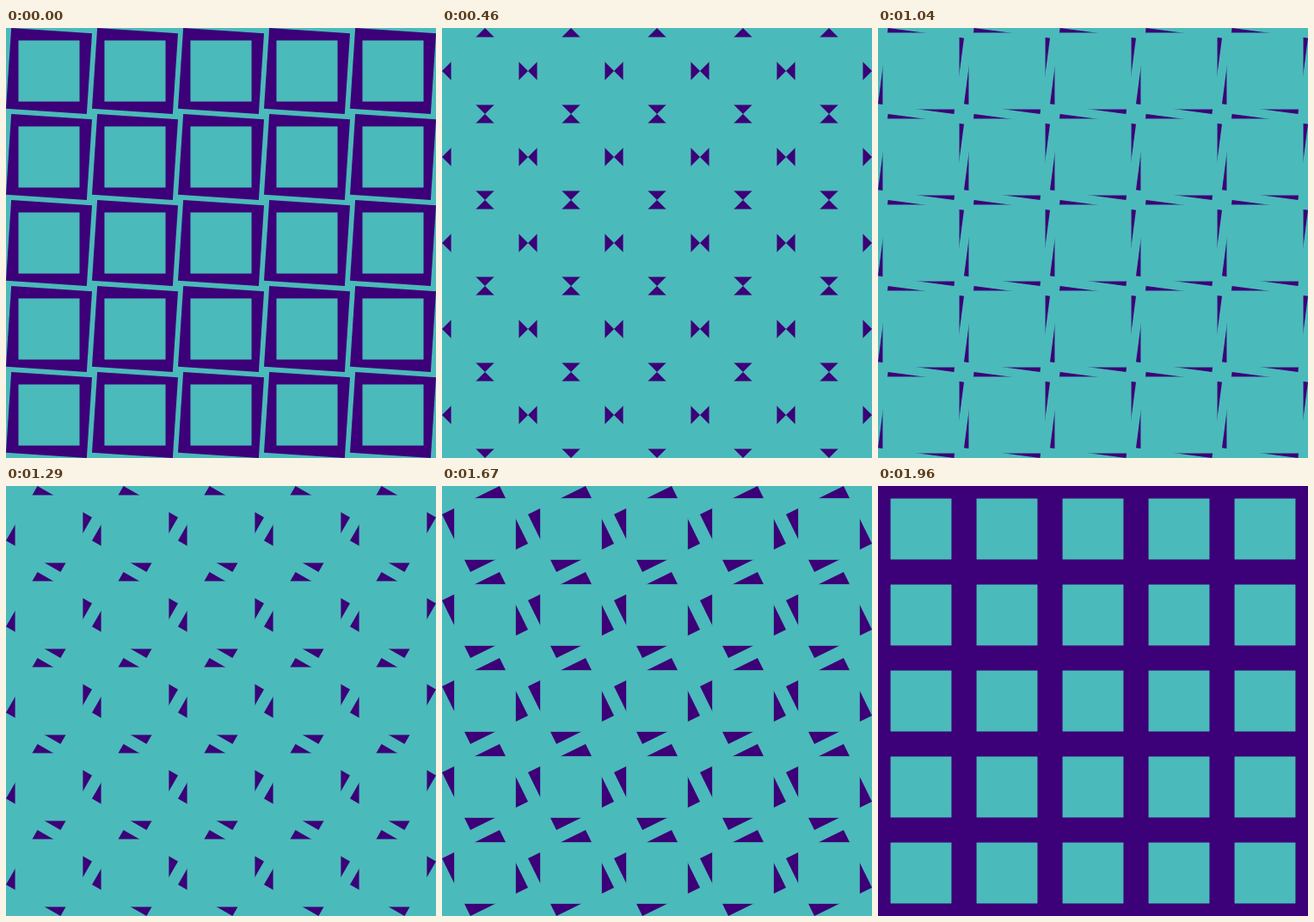
An HTML page with a canvas that plays this animation: 500 px wide and 500 px high, repeating every 2000 ms.

```html
<!DOCTYPE html>
<html lang="en">
<head>
<meta charset="utf-8">
<title>Turning squares</title>
<style>
  html, body { margin: 0; width: 100%; height: 100%; overflow: hidden; background: #4bbaba; }
  canvas { display: block; width: 500px; height: 500px; }
</style>
</head>
<body>
<canvas id="stage" width="500" height="500"></canvas>
<script>
const ctx = document.getElementById('stage').getContext('2d');
const TEAL = '#4bbaba', PURPLE = '#3c0078';
const SIZE = 500, CELL = 100, LOOP = 2000, STEPS = 48;
const rad = deg => deg * Math.PI / 180;

// Side of the square that, turned by angle a, just fits inside one cell
const fitted = a => CELL / (Math.abs(Math.cos(a)) + Math.abs(Math.sin(a)));

function square(cx, cy, side, angle, color) {
  ctx.save();
  ctx.translate(cx, cy);
  if (angle) ctx.rotate(angle);
  ctx.fillStyle = color;
  ctx.fillRect(-side / 2, -side / 2, side, side);
  ctx.restore();
}

function draw(step) {
  const turn = rad((step + 1) * 180 / STEPS % 90);
  const outer = fitted(turn);
  const inner = fitted(rad((step - 21) * 90 / STEPS));
  ctx.fillStyle = TEAL;
  ctx.fillRect(0, 0, SIZE, SIZE);
  for (let y = CELL / 2; y < SIZE; y += CELL) {
    for (let x = CELL / 2; x < SIZE; x += CELL) {
      square(x, y, outer, turn, PURPLE);
      square(x, y, inner, 0, TEAL);
    }
  }
}

// 24 pictures per second; the small lead absorbs clock rounding
function tick() {
  const t = (performance.now() + 4) % LOOP;
  draw(Math.floor(t / LOOP * STEPS));
  requestAnimationFrame(tick);
}
tick();
</script>
</body>
</html>
```
